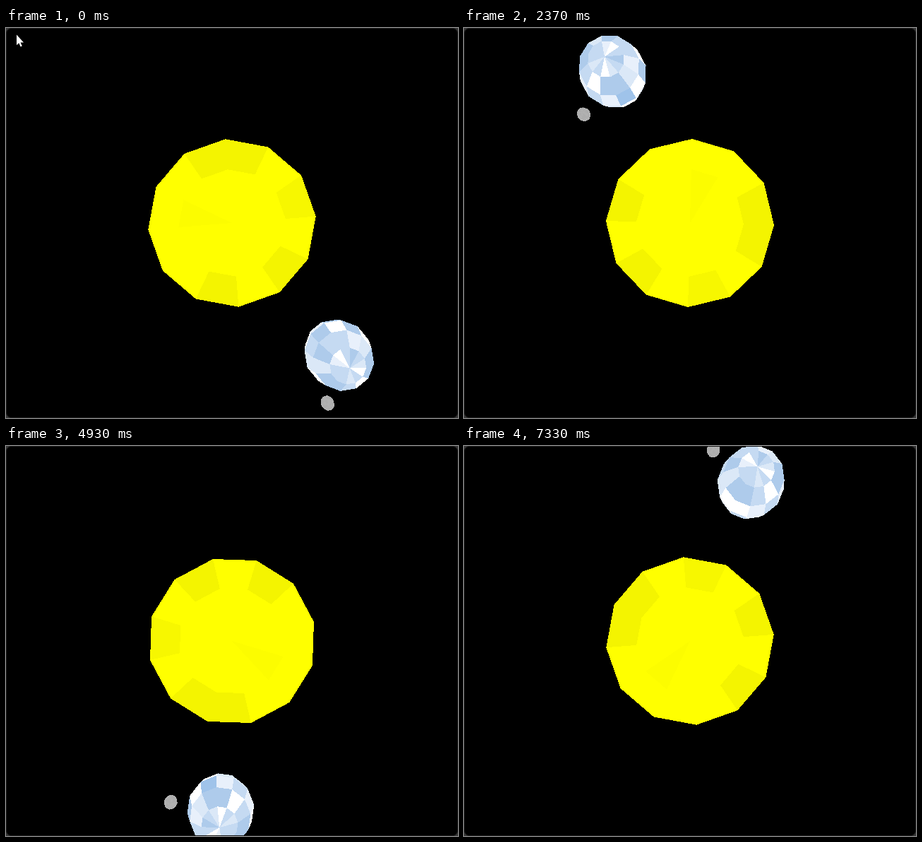
An HTML page that plays this animation: 640 px wide and 552 px high, repeating every 7.36 s.

```html
<!DOCTYPE html>
<html lang="en">
<head>
<meta charset="utf-8">
<title>Low-poly orbit</title>
<style>
  html, body { margin: 0; width: 100%; height: 100%; overflow: hidden; background: #000; }
  svg { display: block; width: 100vw; height: 100vh; }
</style>
</head>
<body>
<svg viewBox="0 0 640 552">
  <defs>
    <clipPath id="window"><rect x="1" y="1" width="638" height="550" rx="7"/></clipPath>
  </defs>
  <rect width="640" height="552" fill="#363636"/>
  <rect x=".5" y=".5" width="639" height="551" rx="7" fill="#000" stroke="#1c1c1c"/>
  <g clip-path="url(#window)"><g id="scene" shape-rendering="crispEdges"></g></g>
  <path id="cursor" fill="#fff" d="M15 9.5V24.2L18.3 21.2L20.6 26.4L22.8 25.4L20.5 20.4H25Z"/>
</svg>
<script>
const LOOP = 7360, FPS = 30, CURSOR_HIDES = 1300;
const STEP = Math.PI / 6;
const CAMERA_HEIGHT = 20, FOCAL = 275 / Math.tan(Math.PI / 6);
const START_ANGLE = 0.4447, SPEED = 0.7175;
const scene = document.getElementById('scene');
const cursor = document.getElementById('cursor');

// A sphere of 12 x 6 facets; each row lists palette indices from the pole down.
function makeSphere(radius, palette, rows) {
  const faces = [];
  rows.forEach((row, ring) => [...row].forEach((tone, sector) => {
    const path = document.createElementNS('http://www.w3.org/2000/svg', 'path');
    path.setAttribute('fill', palette[tone]);
    scene.append(path);
    faces.push({ path, ring, sector });
  }));
  return { radius, faces };
}

// Camera looks straight down; height brings a point closer to it.
function project(x, height, z) {
  const scale = FOCAL / (CAMERA_HEIGHT - height);
  return [320 + x * scale, 276 + z * scale];
}

function signedArea(points) {
  return points.reduce((sum, [x, y], i) => {
    const [nx, ny] = points[(i + 1) % points.length];
    return sum + x * ny - nx * y;
  }, 0);
}

function drawSphere({ radius, faces }, x, z, spin) {
  const vertex = (ring, sector) => {
    const tilt = ring * STEP, turn = spin + sector * STEP;
    const r = radius * Math.sin(tilt);
    return project(x + r * Math.cos(turn), radius * Math.cos(tilt), z + r * Math.sin(turn));
  };
  for (const { path, ring, sector } of faces) {
    const points = [
      vertex(ring, sector), vertex(ring, sector + 1),
      vertex(ring + 1, sector + 1), vertex(ring + 1, sector)
    ];
    const visible = signedArea(points) < 0;
    path.setAttribute('d', visible
      ? 'M' + points.map(p => p.map(n => n.toFixed(2)).join(' ')).join('L') + 'Z'
      : '');
  }
}

const sun = makeSphere(5, ['#ffff00', '#fcfc00', '#f4f400', '#f7f700'],
  ['000001000000', '202000022030', '202000022030']);
const earth = makeSphere(2, ['#ffffff', '#e8f0fb', '#dbe8f7', '#c5daf2', '#aecbeb', '#9fc3ea'],
  ['320323331034', '244034424331', '051310023404', '102213120142']);
const moon = makeSphere(0.4, ['#adadad', '#b1b1b1'],
  ['010011011010', '100101101001', '011010010110', '101001011010']);

function render(ms) {
  const frame = Math.floor((ms + 3.4) * FPS / 1000);
  // One frame of motion is lost just after the start.
  const time = (frame > 1 ? frame - 1 : frame) / FPS;
  const angle = START_ANGLE + SPEED * time;
  const orbit = angle * 2, moonOrbit = angle * 4;
  const x = 10 * Math.cos(orbit), z = 10 * Math.sin(orbit);
  drawSphere(sun, 0, 0, angle);
  drawSphere(earth, x, z, angle * 12);
  drawSphere(moon, x + 3 * Math.cos(moonOrbit), z + 3 * Math.sin(moonOrbit), moonOrbit);
  cursor.style.display = ms < CURSOR_HIDES ? '' : 'none';
}

const start = performance.now();
function tick() {
  render((performance.now() - start) % LOOP);
  requestAnimationFrame(tick);
}
tick();
</script>
</body>
</html>
```
